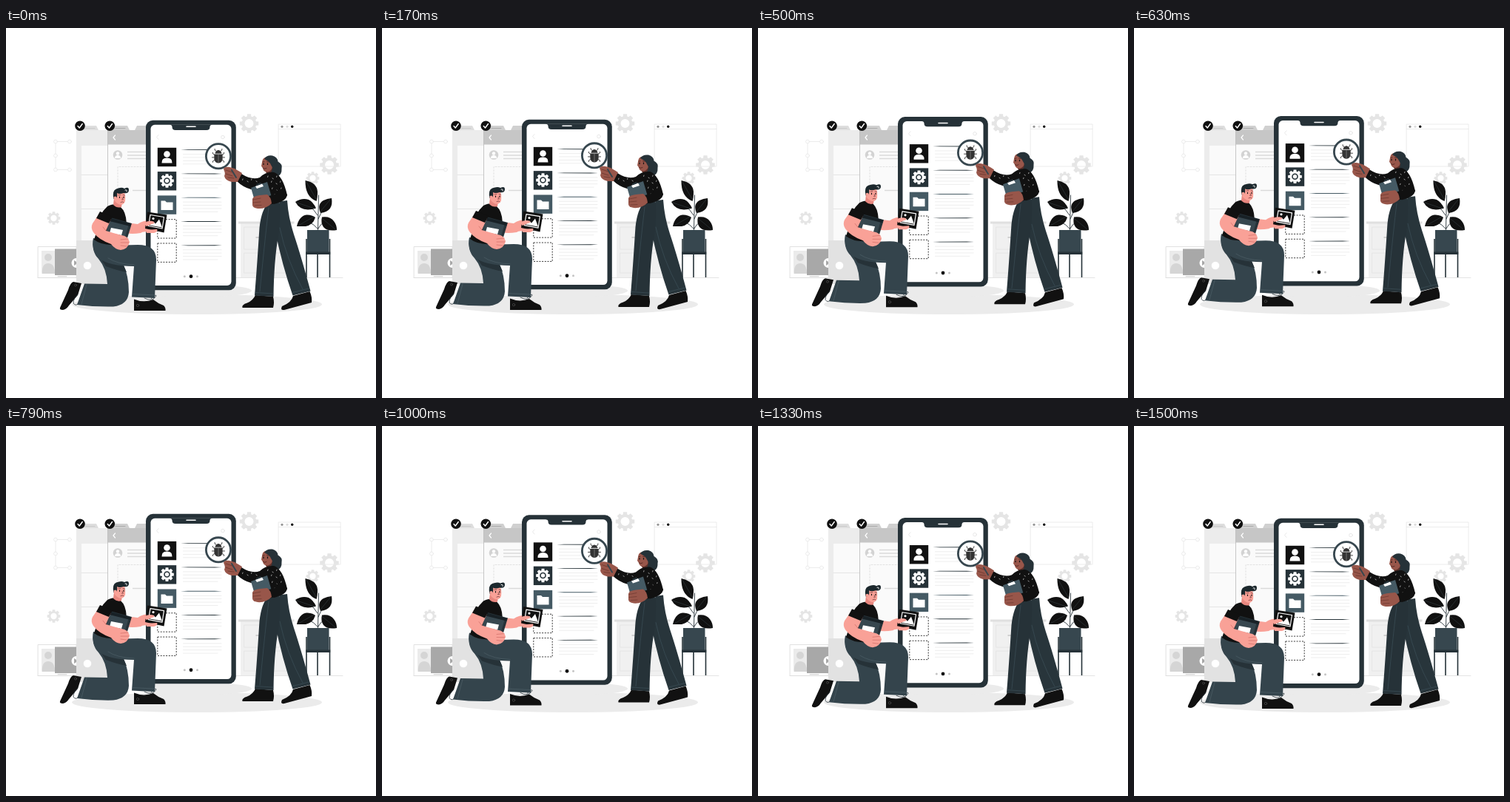
Recreate the animation shown at these times as an HTML page. Size 500 px wide and 500 px high, loop 1.54 s.

```html
<!DOCTYPE html>
<html lang="en">
<head>
<meta charset="utf-8">
<title>App design team</title>
<style>
html, body { margin: 0; width: 100%; height: 100%; overflow: hidden; background: #fff; }
svg { display: block; width: 100vw; height: 100vh; }
</style>
</head>
<body>
<svg viewBox="0 0 500 500" fill="none" stroke-linecap="round" stroke-linejoin="round">
  <!-- room -->
  <path d="M43 337.5H455" stroke="#dedede" stroke-width=".8"/>
  <ellipse cx="258" cy="373.5" rx="169" ry="13.5" fill="#ebebeb"/>
  <ellipse cx="252" cy="355" rx="80" ry="9" fill="#ebebeb"/>
  <g id="gears"></g>

  <g stroke="#e8e8e8" stroke-width=".8">
    <path d="M67 153.500H86M67 153V191M67 191.500H86"/>
    <g id="handles" fill="#fff"></g>
    <path d="M368.500 130H452V187H368.500ZM368.500 136.500H452"/>
  </g>
  <circle cx="373" cy="133.300" r="1.600" fill="#969696"/>
  <circle cx="380" cy="133.300" r="1.600" fill="#dcdcdc"/>
  <circle cx="386.700" cy="133.300" r="1.700" fill="#111"/>

  <!-- cabinet -->
  <path d="M317 264H387V337H317Z" fill="#f0f0f0"/>
  <path d="M314 261.500H389.500V264.500H314Z" fill="#e0e0e0"/>
  <path d="M322 269H349V299H322ZM354 269H382V299H354ZM322 304H349V331H322ZM354 304H382V331H354Z" stroke="#e2e2e2" stroke-width=".8"/>
  <path d="M338 283H342M367 283H371" stroke="#c6c6c6" stroke-width="1.500"/>

  <!-- picture cards -->
  <path d="M43.500 295.500H95V337.500H43.500Z" fill="#fff" stroke="#dadada" stroke-width=".8"/>
  <path d="M48 301H66V332H48Z" fill="#ebebeb"/>
  <circle cx="57" cy="310" r="5" fill="#d5d5d5"/>
  <path d="M49 332Q48 318 57 318Q66 318 66 332Z" fill="#d5d5d5"/>
  <path d="M66 298.500H97V334H66Z" fill="#a8a8a8"/>
  <path d="M70 335.700H82" stroke="#bbb" stroke-width=".8"/>
  <circle cx="95" cy="317.500" r="6.500" fill="#fff"/>
  <path d="M92 314L97.500 317.500L92 321Z" fill="#a8a8a8"/>

  <!-- rear screens -->
  <path d="M95 138H137.500V346H95Z" fill="#ececec"/>
  <path d="M101 138L103 132H122L125 138Z" fill="#dedede"/>
  <path d="M107 135.500H120" stroke="#c9c9c9"/>
  <path d="M102 159H137V287H102Z" fill="#fafafa"/>
  <path d="M102 198.500H137M102 244.500H137" stroke="#e4e4e4" stroke-width=".9"/>
  <path d="M95 287H137V346H95Z" fill="#e2e2e2"/>
  <circle cx="110" cy="321" r="5.300" fill="#fff"/>
  <path d="M137.500 138H191V346H137.500Z" fill="#fafafa"/>
  <path d="M137.500 138H191V157.500H137.500Z" fill="#c6c6c6"/>
  <path d="M143 138L145 132H164L167 138ZM174 138L177 132H191V138Z" fill="#d0d0d0"/>
  <path d="M148 135.500H161" stroke="#aaa"/>
  <path d="M147.500 145L145 148L147.500 151" stroke="#fff" stroke-width="1.200"/>
  <path d="M137.500 138V346" stroke="#b9b9b9" stroke-width=".8"/>
  <circle cx="151" cy="171.500" r="6.300" fill="#d3d3d3"/>
  <circle cx="151" cy="169.500" r="2.200" fill="#fff"/>
  <path d="M147 176Q147 172 151 172Q155 172 155 176Z" fill="#fff"/>
  <path d="M164 167.500H190M164 172H190M164 176.500H190M171 219.500H190" stroke="#dadada" stroke-width="1.400" stroke-linecap="butt"/>
  <path d="M191 187.500H151V250" stroke="#dcdcdc" stroke-width=".8" stroke-dasharray="2 2"/>
  <g id="checks"></g>

  <!-- plant -->
  <path d="M421.500 273L422.500 226M421 253Q411 238 404 237M421 271Q410 259 400 261M422 258Q430 240 434 238M422 271Q428 258 440 264" stroke="#263238" stroke-width=".9"/>
  <g fill="#111">
    <path d="M404.500 206Q420 209 421 221Q421 230 419.500 234Q404 228 404.500 206Z"/>
    <path d="M440 230Q443 248 425 250Q420 238 429 233Q434 230.500 440 230Z"/>
    <path d="M391 235Q400 229 409 232Q415 235 419 243.500Q399 250 391 235Z"/>
    <path d="M393 268Q396 254 406 252.500Q413 252 418 256Q415 266 405 268Z"/>
    <path d="M447 273Q434 275 429 269Q425 263 427 255.500Q438 254 443 261Q447 266 447 273Z"/>
  </g>
  <path d="M406 208L419 231M438 232L425 248M393 236L417 244M395 267L416 255M445 272L428 258" stroke="#46545a" stroke-width=".4"/>
  <path d="M407 273H436.500V303H407Z" fill="#37474f"/>
  <path d="M406 285V337M437.500 285V337M421 304V337" stroke="#263238" stroke-width="1.600" stroke-linecap="butt"/>
  <path d="M405.200 302.500H438.300V306H405.200Z" fill="#263238"/>

  <g id="float">
    <!-- phone -->
    <rect x="189" y="124.800" width="121.800" height="229.400" rx="9.500" fill="#263238"/>
    <rect x="195.500" y="130.800" width="109" height="217.200" rx="5.500" fill="#fff"/>
    <path d="M221 130.500H279Q275.500 131 275.500 133.500Q275.500 138 271 138H229Q224.500 138 224.500 133.500Q224.500 131 221 130.500Z" fill="#263238"/>
    <path d="M244 133.300H256" stroke="#fff" stroke-width="1.500"/>
    <path d="M206 144.500L203.500 147.500L206 150.500" stroke="#e2e2e2" stroke-width=".8"/>
    <circle cx="293" cy="147.500" r="2.300" stroke="#e2e2e2" stroke-width=".8"/>
    <g id="rows"></g>
    <g id="icons" fill="#fff">
      <circle cx="217.500" cy="170.500" r="4.300"/>
      <path d="M210.500 182.500Q210 175.500 217.500 175.500Q225 175.500 224.500 182.500Z"/>
      <path d="M209.500 233.500H215L217 235.500H225.500V246H209.500Z"/>
    </g>
    <circle cx="241.300" cy="335.700" r="1.500" fill="#c4c4c4"/>
    <circle cx="250" cy="335.700" r="2.400" fill="#111"/>
    <circle cx="258.500" cy="335.700" r="1.500" fill="#c4c4c4"/>

    <!-- magnifier -->
    <circle cx="287" cy="173.300" r="16.600" fill="#fff" stroke="#37474f" stroke-width="2.800"/>
    <g stroke="#333" stroke-width=".9" transform="translate(0 .4)">
      <path d="M284 166Q281.500 165.500 282 163M290 166Q292.500 165.500 292 163M282 171L279.500 169.500V168M292 171L294.500 169.500V168M281 174.500H278.500M293 174.500H295.500M282 178L279.500 179.500V181M292 178L294.500 179.500V181"/>
      <path d="M283 168.500Q284 165 287 165Q290 165 291 168.500Z" fill="#333"/>
      <path d="M281.500 170H292.500Q294 182 287 182Q280 182 281.500 170Z" fill="#333" stroke="none"/>
      <path d="M287 171V181" stroke="#999" stroke-width=".6"/>
    </g>

    <!-- woman -->
    <path d="M337 361L361 363Q363 371 361 378H319.500Q318 374 326 371.500Q334 368 337 361ZM388 362L410.500 356Q414 364 413 371L376 381Q370 382 373 376Q386 371 388 362Z" fill="#111"/>
    <path d="M358 236L380 233Q381.500 256 389 279Q399 309 411.500 355.500L387.500 361.500Q373 320 364 275Z" fill="#28353b"/>
    <path d="M356 234Q345 245 342.500 270Q339 325 336 361.500L361.500 363Q362 315 368 281Q371 260 370 238Z" fill="#263238"/>
    <path d="M355 243Q351 275 343 356M370 270Q379 313 401 353M337 357.500L361 359M387 357.500L409 352" stroke="#455a64" stroke-width=".5"/>
    <path d="M349 191L361 186L366 198Q358 203 353 198Z" fill="#5a2f29"/>
    <path d="M346.500 179Q348 174.500 352 175Q361 177 360.500 185Q360 193 354 194.500Q348 195 347 189.500L345 186.500Z" fill="#98564a"/>
    <path d="M349 177Q352 171.500 360 172.500Q367 174.500 367.500 180.500Q374 184 372.500 190Q373 198 367 200.500Q361 202 357.500 196.500Q362 190 358 185Q356 180 349 177Z" fill="#263238"/>
    <path d="M348 183V184.500M353.500 183V184.500" stroke="#111" stroke-width="1.200"/>
    <path d="M347.500 189.500Q350 191.200 352 189.500M347 181L349 180.700M352.500 180.700L355 181.200" stroke="#4a211d" stroke-width=".8"/>
    <path d="M312 198L318 197Q332 206 343 202Q351 194 362 195Q374 199 380 226Q378 234 366 236L356 239Q351 222 350 213Q340 219 331 218Q320 215 312 207Z" fill="#111"/>
    <path id="flecks" stroke="#dedede" stroke-width=".7"/>
    <path d="M294 191Q295 187 302 188L309 190Q316 194 319 196L313 208L305 208Q296 206 295 200Q297 196 294 191Z" fill="#98564a"/>
    <path d="M305 192L311 202" stroke="#37474f" stroke-width="2"/>
    <path d="M297 192L306 195M297 197L306 200M300 202L308 203" stroke="#633129" stroke-width=".7"/>
    <path d="M331 216L353 208L360 232L338 240Z" fill="#455a64"/>
    <path d="M337 214L346 210.500L348 214L339 217Z" fill="#fff"/>
    <path d="M339 212L344 210" stroke="#263238" stroke-width="2"/>
    <path d="M366 213L380 225Q378 234 362 238L354 235L355 227L367 224Z" fill="#111"/>
    <path d="M333 231Q334 227 343 226L353 225Q358 228 359 237Q351 245 340 244Q333 243 333 239Z" fill="#98564a"/>
    <path d="M334 232L344 230M334 236L344 235M336 240L345 239.500" stroke="#633129" stroke-width=".6"/>

    <!-- man -->
    <path d="M102 345L91 343Q87 344 84 354L73 378Q72 381 77 381Q82 380 85 375L97 361ZM173 366.500Q186 372 199 367Q205 372 213 375Q216 378 215.500 382H173Z" fill="#111"/>
    <path d="M97 360Q91 365 91 372Q94 376 97 373M187 365Q198 371 203 362Q203 359 196 366" stroke="#263238" stroke-width=".8"/>
    <circle cx="178" cy="375" r="1.700" stroke="#555" stroke-width=".6"/>
    <circle cx="94" cy="347.500" r="1.500" stroke="#555" stroke-width=".6"/>
    <path d="M118 284Q115 302 125 312Q136 325 137 346L106 345.500Q101 360 96 374Q120 377 145 376.500Q165 374 166 357Q166 335 158 318L145 292Z" fill="#34444c"/>
    <path d="M128 312Q142 321 158 319L163 330Q151 328 135 322Z" fill="#263238"/>
    <path d="M118 284Q123 293 140 294L178 293Q203 293 203 313L201 365L170 363.500L173 322Q140 322 125 311Q115 300 118 284Z" fill="#34444c"/>
    <path d="M138 311Q150 319 173 320M171 359.500L201 361M109 347L102 373" stroke="#566871" stroke-width=".5"/>
    <path d="M137 241Q142 238 150 238Q160 244 162 256L164 274Q159 289 143 293Q128 293 119 286Q122 276 126 266Q124 253 137 241Z" fill="#111"/>
    <path d="M146 230L157 235L156 242Q150 244 145 239Z" fill="#e8877f"/>
    <path d="M148 224Q150 221 160 222Q162 228 161 234Q159 240 153 238.500Q147 236 146 231Z" fill="#f9a197"/>
    <path d="M145.500 231Q143 220 149 217.500Q156 214.500 160 217Q166 214 166 219Q166 224 159 223Q153 225 150 223Q151 229 148 231Z" fill="#1c282d"/>
    <path d="M161 219Q164 218 163 221" stroke="#fff" stroke-width=".9"/>
    <circle cx="147.500" cy="229.500" r="2" fill="#f9a197"/>
    <path d="M153.500 228V229.300M159 228V229.300" stroke="#111" stroke-width="1.200"/>
    <path d="M152 225.800L155 225.500M158 225.500L160.500 226M155 235.500Q157.500 234 159 235.500M157 229.500L158.500 232H156.500" stroke="#632f31" stroke-width=".7"/>
    <path d="M161 263L178 265Q185 260 195 260L205 264Q207 267 204 271L195 276Q185 274 182 277Q170 279 161 277Z" fill="#f9a197"/>
    <path d="M191 248.500L217.500 252.500L213.500 276.500L188 271Z" fill="#111"/>
    <path d="M195 252.500L213.500 255.500L211 271L192.500 267.500Z" stroke="#fff" stroke-width="1.200"/>
    <path d="M194 266.500L199 261.500L202 264.500L207 258.500L211 269.500Z" fill="#fff"/>
    <circle cx="199" cy="257.500" r="1.600" fill="#fff"/>
    <path d="M186 264Q193 259 200 262Q202 264 197 265L190 268ZM189 273L204 272Q206 275 200 277L190 277Z" fill="#f9a197"/>
    <path d="M141 256L170 264L163 287L134 279Z" fill="#263238"/>
    <path d="M140 259L166 265L160 286L134 281Z" fill="#37474f"/>
    <path d="M141 257L169 264.500L168 268L140 261Z" fill="#182126"/>
    <path d="M142 270L158 273L156 280L140 277Z" fill="#fff"/>
    <path d="M126 251L142 258L135 274L145 277L156 280Q165 281 167 289Q165 299 155 300Q147 299 142 292Q125 286 118 276Q114 270 117 264Z" fill="#f9a197"/>
    <path d="M127 248L144 255L139 264L122 257Z" fill="#111"/>
    <path d="M155 286L165 285M155 290L166 290M155 294L163 295M135 274L131 269" stroke="#c9635f" stroke-width=".6"/>
  </g>
</svg>
<script>
const el = id => document.getElementById(id);
const add = (id, html) => el(id).insertAdjacentHTML("beforeend", html);

// Eight-toothed wheel with a round hole.
function gear(x, y, r, hole, color) {
  const pts = [];
  for (let i = 0; i < 8; i++) {
    for (const [da, k] of [[-.29, .76], [-.2, 1], [.2, 1], [.29, .76]]) {
      const a = i * Math.PI / 4 + da;
      pts.push(`${x + r * k * Math.cos(a)} ${y + r * k * Math.sin(a)}`);
    }
  }
  const ring = `M${x - hole} ${y}a${hole} ${hole} 0 1 0 ${2 * hole} 0a${hole} ${hole} 0 1 0 ${-2 * hole} 0Z`;
  return `<path d="M${pts.join("L")}Z${ring}" fill="${color}" fill-rule="evenodd"/>`;
}

for (const [x, y, r] of [[64.5, 257, 9], [328.5, 129, 13], [437, 185, 13], [414.5, 203, 9]]) {
  add("gears", gear(x, y, r, r * .46, "#e5e5e5"));
}
add("icons", gear(217.5, 206.5, 9.5, 4.3, "#fff") + '<circle cx="217.5" cy="206.5" r="2.7"/>');

for (const [x, y] of [[67, 153.5], [86, 153.5], [67, 172.5], [67, 191.5], [86, 191.5]]) {
  add("handles", `<circle cx="${x}" cy="${y}" r="2.4"/>`);
}

for (const x of [100, 140.3]) {
  add("checks", `<circle cx="${x}" cy="132.3" r="6.8" fill="#111"/>
    <path d="M${x - 3} 132.5l2.2 2.5 4-5.5" stroke="#fff" stroke-width="1.4"/>`);
}

["#111", "#263238", "#455a64", "", ""].forEach((color, i) => {
  const y = 164.6 + i * 32.3;
  const tone = i === 2 ? "#455a64" : "#263238";
  const box = color ? `fill="${color}"` : 'stroke="#222" stroke-width=".9" stroke-dasharray="2 1.7" stroke-linecap="butt"';
  let row = `<rect x="204.8" y="${y - 2.8}" width="25.4" height="25.4" ${box}/>
    <path d="M236 ${y}L246 ${y - .4}L282 ${y - .5}L292 ${y}L282 ${y + .5}L246 ${y + .4}Z" fill="${tone}"/>`;
  for (const d of [6, 10.3, 14.8, 19.2]) {
    row += `<path d="M239.5 ${y + d}H${d > 19 ? 286 : 291}" stroke="#e6e6e6" stroke-width=".7"/>`;
  }
  add("rows", row);
});

// Scattered fabric pattern.
let d = "";
for (const [x, y, n] of [[320, 204, 4], [354, 200, 3], [359, 207, 3], [360, 216, 3], [363, 225, 2], [362, 232, 2]]) {
  for (let i = 0; i < n; i++) {
    d += `M${x + i * 6} ${y + (i % 2) * 3}l${i % 2 ? "1.2 .8" : "-.4 1.4"}`;
  }
}
el("flecks").setAttribute("d", d);

const LOOP = 1540, LIFT = 6, LEAD = 30;
const float = el("float");

function draw(t) {
  const phase = ((t + LEAD) % LOOP) / LOOP;
  const y = LIFT / 2 * (Math.cos(phase * 2 * Math.PI) - 1);
  float.setAttribute("transform", `translate(0 ${y.toFixed(3)})`);
}

const start = performance.now();
function tick() {
  draw(performance.now() - start);
  requestAnimationFrame(tick);
}
tick();
</script>
</body>
</html>
```
